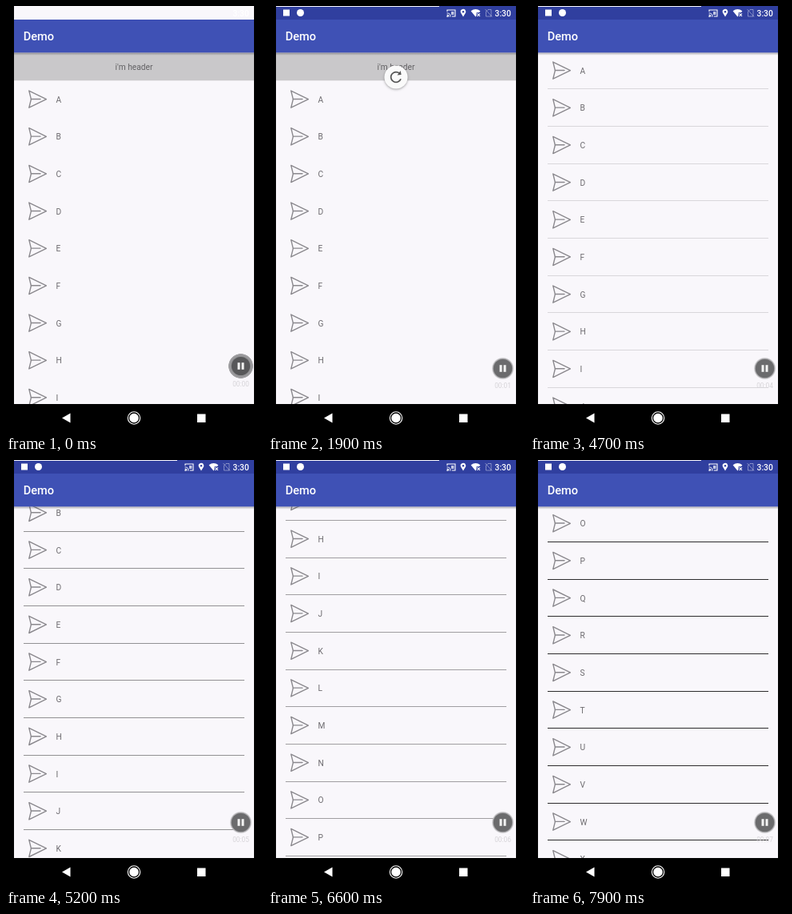
An HTML page with a canvas for the animation above (8 s loop, 320 by 533 pixels).

```html
<!DOCTYPE html>
<html lang="en">
<head>
<meta charset="utf-8">
<title>Demo list</title>
<style>
  html, body { margin: 0; width: 100%; height: 100%; overflow: hidden; background: #000; }
  canvas { display: block; width: 320px; height: 533px; }
</style>
</head>
<body>
<canvas id="stage"></canvas>
<script>
const W = 320, H = 533, LOOP = 8000, STEP = 100;
const DP = 300 / 411.43;
const LEFT = 10, RIGHT = 310, TOP = 58.3, BOTTOM = 498;
const HEADER = 48 * DP, ROW = 64 * DP;
const PAPER = '#f9f7fb';
const TAU = Math.PI * 2;

const canvas = document.getElementById('stage');
const ratio = window.devicePixelRatio || 1;
canvas.width = W * ratio;
canvas.height = H * ratio;
const c = canvas.getContext('2d');

const clamp = (v) => Math.min(1, Math.max(0, v));
const ease = (v) => { v = clamp(v); return v * v * (3 - 2 * v); };
const span = (t, a, b) => clamp((t - a) / (b - a));
const mix = (a, b, k) => a + (b - a) * k;

// Linear interpolation through [time, value] pairs.
function track(points, t) {
  if (t <= points[0][0]) return points[0][1];
  for (let i = 1; i < points.length; i++) {
    const [t0, v0] = points[i - 1], [t1, v1] = points[i];
    if (t <= t1) return mix(v0, v1, (t - t0) / (t1 - t0));
  }
  return points[points.length - 1][1];
}

const SCROLL = [[4500, 0], [4700, 36], [5700, 158.8], [6600, 344.6], [7900, 690.7]];
const DIVIDER = [[4500, 0], [4700, .13], [5700, .7], [6600, .36], [7900, .82]];

function rect(x, y, w, h, fill) {
  c.fillStyle = fill;
  c.fillRect(x, y, w, h);
}

function disc(x, y, r, fill) {
  c.fillStyle = fill;
  c.beginPath();
  c.arc(x, y, r, 0, TAU);
  c.fill();
}

function poly(points, close = true) {
  c.beginPath();
  points.forEach(([x, y], i) => i ? c.lineTo(x, y) : c.moveTo(x, y));
  if (close) c.closePath();
}

function text(str, x, y, size, fill, weight = 400, align = 'left') {
  c.font = `${weight} ${size}px Roboto, sans-serif`;
  c.textAlign = align;
  c.fillStyle = fill;
  c.fillText(str, x, y);
}

function plane(y) {
  c.strokeStyle = '#8b898e';
  c.lineWidth = 1.4;
  c.lineJoin = c.lineCap = 'round';
  poly([[28.8, y - 10.6], [50.4, y], [28.8, y + 10.6], [31.4, y]]);
  c.stroke();
  poly([[31.4, y - .2], [43, y - .2]], false);
  c.stroke();
}

function list(t) {
  const off = track(SCROLL, t), alpha = track(DIVIDER, t);
  const top = TOP - off;
  if (off < HEADER) {
    rect(LEFT, top, RIGHT - LEFT, HEADER, '#c9c8ca');
    text("i'm header", 160, top + 21.4, 14 * DP, '#626164', 400, 'center');
  }
  for (let i = 0; i < 26; i++) {
    const y = top + HEADER + i * ROW;
    if (y + ROW < TOP || y > BOTTOM) continue;
    const mid = y + ROW / 2;
    plane(mid);
    text(String.fromCharCode(65 + i), 62.6, mid + 4, 14 * DP, '#6c6a6e');
    rect(22, Math.floor(y + ROW), 276, 1, `rgba(0,0,0,${alpha})`);
  }
}

function pullArrow(x, y, turn) {
  const r = 6.4, start = .35 + turn, end = start + TAU * .8;
  c.strokeStyle = c.fillStyle = '#555';
  c.lineWidth = 1.8;
  c.lineCap = 'butt';
  c.beginPath();
  c.arc(x, y, r, start, end);
  c.stroke();
  c.save();
  c.translate(x + r * Math.cos(end), y + r * Math.sin(end));
  c.rotate(end);
  poly([[-3.4, -.4], [3.4, -.4], [0, 3.4]]);
  c.fill();
  c.restore();
}

function spinArc(x, y, t) {
  const u = (t - 2950) / 1332, n = Math.floor(u), p = u - n;
  const base = -80 + 216 * u + 270 * n;
  const start = base + 270 * ease(p * 2 - 1);
  const end = base + 16 + 270 * ease(p * 2);
  c.strokeStyle = '#111';
  c.lineWidth = 1.8;
  c.lineCap = 'butt';
  c.beginPath();
  c.arc(x, y, 6.4, start * TAU / 360, end * TAU / 360);
  c.stroke();
}

function refresher(t) {
  if (t < 1100 || t >= 4250) return;
  const drag = ease(span(t, 1100, 1800));
  const y = mix(43, 89, drag) + 1.5 * ease(span(t, 2000, 2200));
  const scale = 1 - span(t, 4100, 4250);
  c.save();
  c.translate(160, y);
  c.scale(scale, scale);
  c.shadowColor = 'rgba(0,0,0,.35)';
  c.shadowBlur = 3 * ratio;
  c.shadowOffsetY = ratio;
  disc(0, 0, 14.6, '#fafafa');
  c.shadowColor = 'transparent';
  if (t < 2100) pullArrow(0, 0, (drag - 1) * 3);
  else spinArc(0, 0, t);
  c.restore();
}

function statusIcons() {
  const ink = '#fff';
  rect(19, 4.5, 8, 8, ink);
  disc(40.5, 8.5, 4.5, ink);

  // Cast
  c.strokeStyle = ink;
  c.lineWidth = 1.1;
  c.lineJoin = 'miter';
  c.lineCap = 'butt';
  poly([[224, 7], [224, 5], [234, 5], [234, 13], [230, 13]], false);
  c.stroke();
  for (const r of [2.4, 4.6]) {
    c.beginPath();
    c.arc(223.6, 13.4, r, -Math.PI / 2, 0);
    c.stroke();
  }
  disc(224.2, 12.9, .9, ink);
  rect(229, 7, 3.4, 4, 'rgba(255,255,255,.7)');

  // Location pin
  c.fillStyle = ink;
  c.beginPath();
  c.arc(244, 7.2, 3.3, Math.PI * .9, Math.PI * .1);
  c.lineTo(244, 13.6);
  c.closePath();
  c.fill();
  disc(244, 7.2, 1.2, '#303f9f');

  // Wi-Fi with a cross
  c.fillStyle = ink;
  c.beginPath();
  c.moveTo(259.5, 13.4);
  c.lineTo(253.6, 6.2);
  c.quadraticCurveTo(259.5, 2, 265.4, 6.2);
  c.closePath();
  c.fill();
  rect(260.6, 8.2, 5.4, 6, '#303f9f');
  c.strokeStyle = ink;
  poly([[261.6, 9.4], [265, 12.8]], false);
  c.stroke();
  poly([[265, 9.4], [261.6, 12.8]], false);
  c.stroke();

  // No SIM
  c.strokeStyle = 'rgba(255,255,255,.4)';
  c.lineWidth = 1;
  poly([[272.5, 7], [275, 4.5], [279, 4.5], [279, 13], [272.5, 13]]);
  c.stroke();
  poly([[271.5, 4], [280, 13.5]], false);
  c.stroke();
}

function bars(t) {
  const shade = c.createLinearGradient(0, TOP, 0, TOP + 3.5);
  shade.addColorStop(0, 'rgba(0,0,0,.3)');
  shade.addColorStop(1, 'rgba(0,0,0,0)');
  rect(LEFT, TOP, RIGHT - LEFT, 3.5, shade);
  rect(LEFT, 17, RIGHT - LEFT, TOP - 17, '#3f51b5');
  text('Demo', 21.7, 43.2, 20 * DP, '#fff', 500);

  const dark = span(t, 100, 400);
  rect(LEFT, 0, RIGHT - LEFT, 17, PAPER);
  c.globalAlpha = dark;
  rect(LEFT, 0, RIGHT - LEFT, 17, '#303f9f');
  statusIcons();
  c.globalAlpha = 1;
  text('3:30', 283.6, 12.6, 14 * DP, '#fff', 500);
  rect(LEFT, 0, 204, 1, PAPER);
}

function recorder(t) {
  const k = ease(span(t, 100, 500));
  const x = 293.5, y = mix(450.5, 453.5, k), r = mix(15.8, 14, k);
  const glow = c.createRadialGradient(x, y, 11, x, y, r);
  glow.addColorStop(0, '#8b8b8d');
  glow.addColorStop(mix(.85, .5, k), mix(0, 1, k) < .5 ? '#a2a1a4' : '#b4b3b6');
  glow.addColorStop(1, 'rgba(200,199,202,0)');
  disc(x, y, r, glow);
  disc(x, y, 11.6, k < .5 ? '#58585a' : '#6b6b6d');
  rect(x - 4, y - 4.3, 3, 8.6, '#f4f4f4');
  rect(x + 1, y - 4.3, 3, 8.6, '#f4f4f4');
  const clock = '00:0' + Math.floor(t / 1000);
  text(clock, x, mix(476, 478.3, k), 8.3, '#d6d4d8', 400, 'center');
}

function navigation() {
  rect(0, BOTTOM, W, H - BOTTOM, '#000');
  c.fillStyle = '#fff';
  poly([[70, 515.5], [80.5, 509.5], [80.5, 521.5]]);
  c.fill();
  disc(160, 515.5, 5.8, '#fff');
  c.strokeStyle = '#fff';
  c.lineWidth = 1.1;
  c.beginPath();
  c.arc(160, 515.5, 7.7, 0, TAU);
  c.stroke();
  rect(239, 510.5, 10.5, 10.5, '#fff');
}

function draw(t) {
  c.setTransform(ratio, 0, 0, ratio, 0, 0);
  rect(0, 0, W, H, '#000');
  rect(LEFT, 0, RIGHT - LEFT, BOTTOM, PAPER);
  c.save();
  c.beginPath();
  c.rect(LEFT, TOP, RIGHT - LEFT, BOTTOM - TOP);
  c.clip();
  list(t);
  refresher(t);
  c.restore();
  bars(t);
  recorder(t);
  navigation();
}

let origin = null;
function tick(now) {
  if (origin === null) origin = now;
  const t = (now - origin) % LOOP;
  draw(Math.floor(t / STEP) * STEP);
  requestAnimationFrame(tick);
}
draw(0);
requestAnimationFrame(tick);
</script>
</body>
</html>
```
